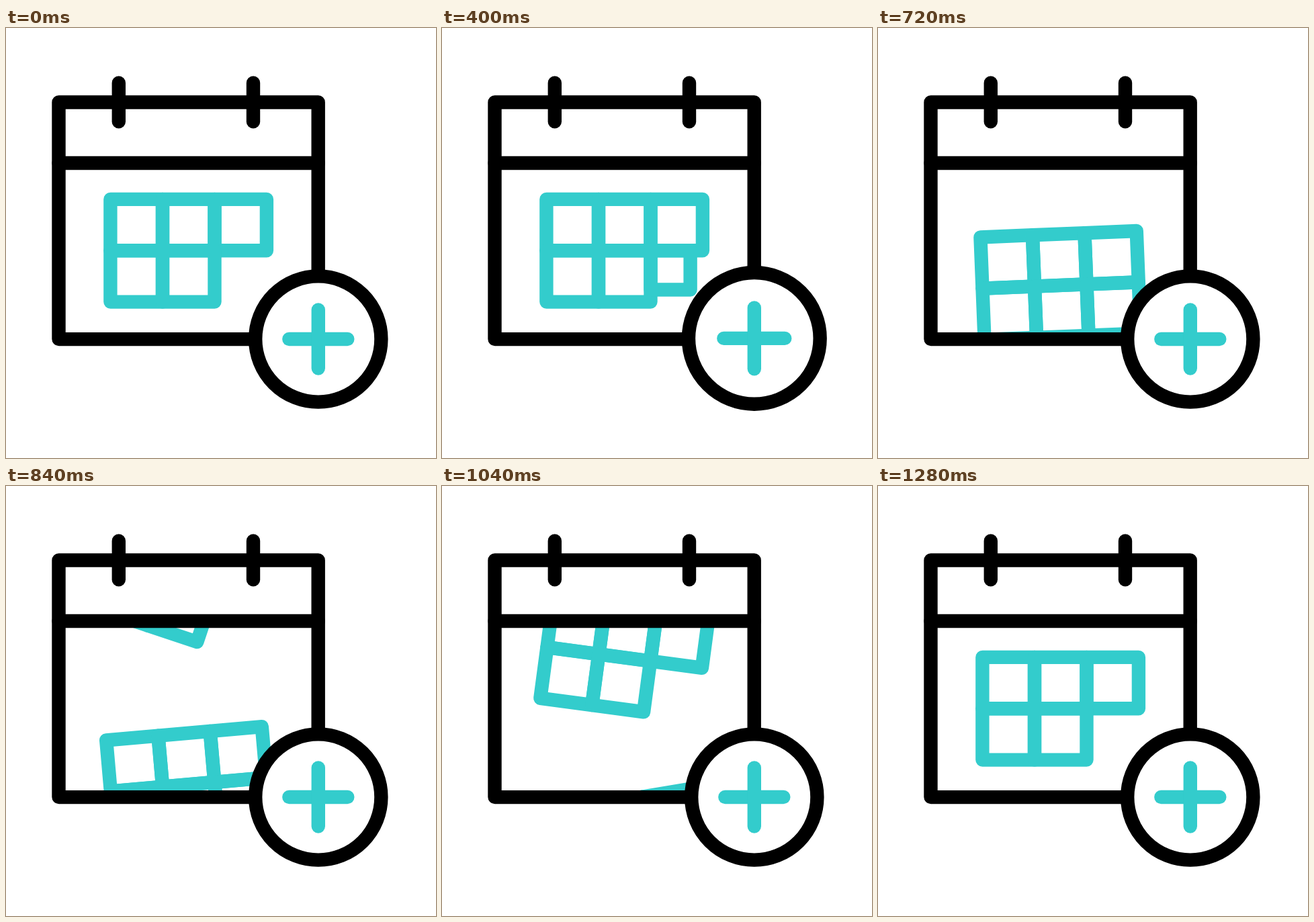
Animation, 640 px wide and 640 px high, one loop 1480 ms. Source, as an HTML page with a canvas:

```html
<!DOCTYPE html>
<html lang="en">
<head>
<meta charset="utf-8">
<title>Calendar</title>
<style>
  html, body { margin: 0; width: 100%; height: 100%; overflow: hidden; background: #fff; }
  canvas { display: block; width: 640px; height: 640px; }
</style>
</head>
<body>
<canvas id="stage" width="640" height="640"></canvas>
<script>
const ctx = document.getElementById('stage').getContext('2d');
const LOOP = 1480, STEP = 40;
const BLACK = '#000', TEAL = '#33cccc';
const COLS = [155.4, 233, 310.5, 387.9];
const ROWS = [254.9, 331.2, 407.6];
const CENTER = { x: (COLS[0] + COLS[3]) / 2, y: ROWS[1] };

// Eased progress from 0 to 1 between two times.
function ease(t, start, end) {
  const u = Math.min(1, Math.max(0, (t - start) / (end - start)));
  return u * u * (3 - 2 * u);
}

function line(x1, y1, x2, y2) {
  ctx.beginPath();
  ctx.moveTo(x1, y1);
  ctx.lineTo(x2, y2);
  ctx.stroke();
}

function drawGrid(dy, degrees, lastCell) {
  ctx.save();
  ctx.translate(CENTER.x, CENTER.y + dy);
  ctx.rotate(degrees * Math.PI / 180);
  ctx.translate(-CENTER.x, -CENTER.y);
  ctx.strokeStyle = TEAL;
  for (let row = 0; row < 2; row++) {
    for (let col = 0; col < 3; col++) {
      const size = row === 1 && col === 2 ? lastCell : 1;
      if (size <= 0) continue;
      ctx.strokeRect(COLS[col], ROWS[row],
        (COLS[col + 1] - COLS[col]) * size, (ROWS[row + 1] - ROWS[row]) * size);
    }
  }
  ctx.restore();
}

function drawCalendar() {
  ctx.strokeStyle = BLACK;
  ctx.strokeRect(78.5, 110.5, 386.2, 352.6);
  line(78.5, 201, 464.7, 201);
  for (const x of [167.8, 368]) line(x, 81.7, x, 139.4);
}

function drawButton(pulse) {
  const scale = 1 + 0.07 * pulse;
  const x = 464.8, y = 463 - 1.7 * pulse, arm = 43.5 * scale;
  ctx.beginPath();
  ctx.arc(x, y, 93.6 * scale, 0, Math.PI * 2);
  ctx.fillStyle = '#fff';
  ctx.fill();
  ctx.strokeStyle = BLACK;
  ctx.stroke();
  ctx.strokeStyle = TEAL;
  line(x - arm, y, x + arm, y);
  line(x, y - arm, x, y + arm);
}

function draw(t) {
  ctx.fillStyle = '#fff';
  ctx.fillRect(0, 0, 640, 640);
  ctx.lineWidth = 20.4;
  ctx.lineCap = ctx.lineJoin = 'round';

  const fall = ease(t, 520, 1200);
  const arrive = 1 - ease(t, 640, 1280);

  ctx.save();
  ctx.beginPath();
  ctx.rect(78.5, 201, 386.2, 262);
  ctx.clip();
  if (fall < 1) drawGrid(248 * fall, -11 * fall, ease(t, 140, 520));
  if (t >= 640) drawGrid(-239.4 * arrive, 24 * arrive, 0);
  ctx.restore();

  drawCalendar();
  drawButton(ease(t, 120, 320) - ease(t, 320, 520));
}

const begin = performance.now();
function tick() {
  const t = (performance.now() - begin) % LOOP;
  draw(Math.floor(t / STEP) * STEP);
  requestAnimationFrame(tick);
}
tick();
</script>
</body>
</html>
```
